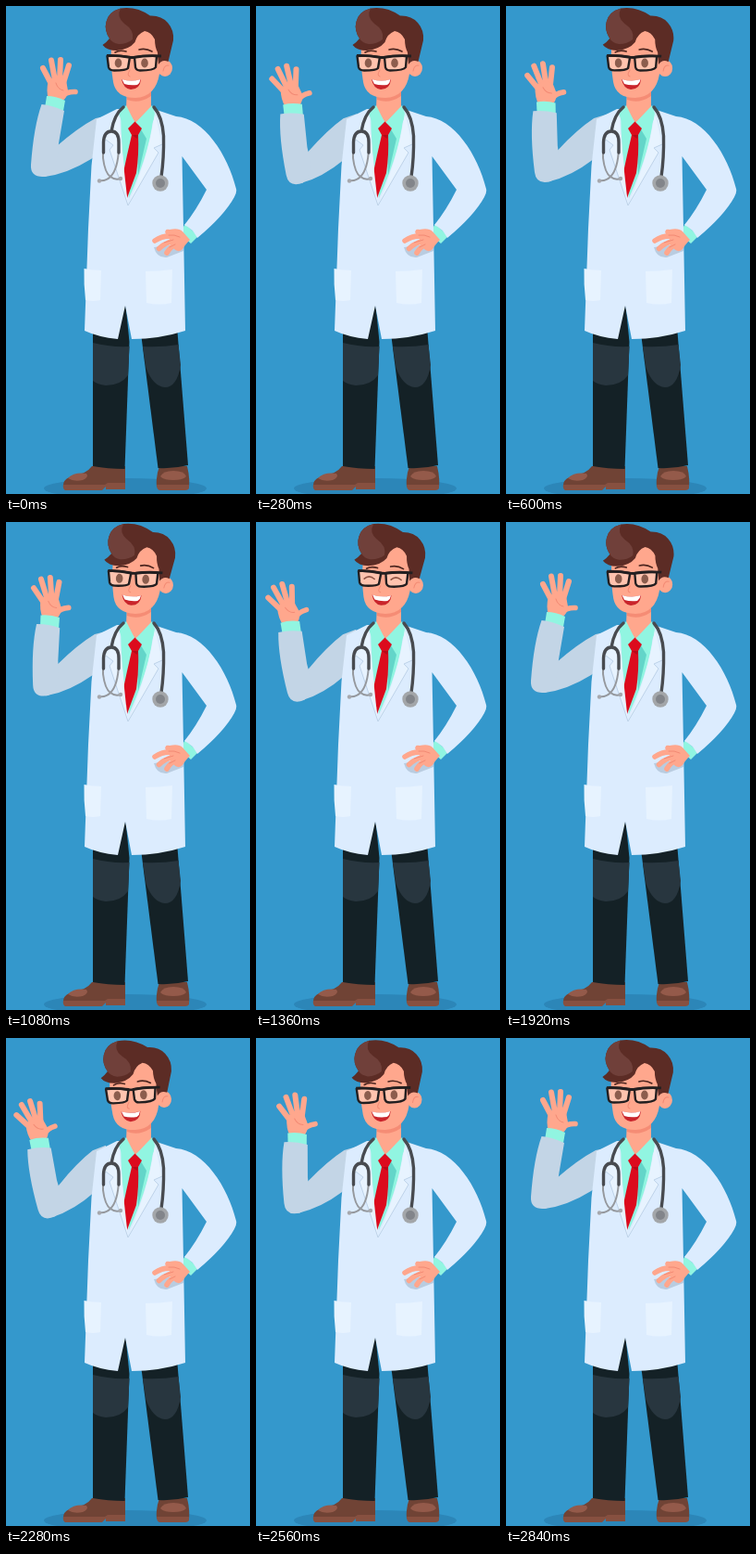
These frames come from a looping animation (264x526 px, 2.88 s). An HTML page:

```html
<!DOCTYPE html>
<html lang="en">
<head>
<meta charset="utf-8">
<title>Waving doctor</title>
<style>
  html, body { margin: 0; width: 100%; height: 100%; overflow: hidden; background: #3498cc; }
  svg { display: block; width: 100%; height: 100%; }
  .skin { fill: #ffa78d; }
  .finger { fill: none; stroke: #ffa78d; stroke-linecap: round; stroke-linejoin: round; }
  .crease { fill: none; stroke: #f28a74; stroke-width: 1; stroke-linecap: round; }
  .sleeve { fill: #c3d5e6; }
  .coat { fill: #dcecfe; }
  .pocket { fill: #e7f3ff; }
  .mint { fill: #91f5e1; }
  .trousers { fill: #142126; }
  .knee { fill: #28363f; }
  .shoe { fill: #704335; }
  .toe { fill: #945a4a; }
  .sole { fill: #875040; }
  .tube { fill: none; stroke: #484b50; stroke-width: 3.4; stroke-linecap: round; }
  .metal { fill: none; stroke: #95989d; stroke-width: 2; stroke-linecap: round; stroke-linejoin: round; }
  .frame { fill: #ffc3ae; stroke: #231f20; stroke-width: 2.4; stroke-linejoin: round; }
  .brow { fill: none; stroke: #4b251f; stroke-width: 1.6; stroke-linecap: round; }
  .lid { fill: none; stroke: #8f5545; stroke-width: 1.6; stroke-linecap: round; }
</style>
</head>
<body>
<svg viewBox="0 0 264 526" preserveAspectRatio="none">
  <ellipse cx="129" cy="520" rx="88" ry="11" fill="#2c86b8"/>

  <!-- shoes and legs -->
  <path class="shoe" d="M93 496H129V518H62Q61 509 74 506Q87 504 93 496Z"/>
  <path class="toe" d="M67 509Q74 502 87 504Q90 508 83 511Q73 513 67 509Z"/>
  <path class="sole" d="M62 516H107L110 514H129V521H108V518L104 522H64Q61 520 62 516Z"/>
  <path class="shoe" d="M166 496H196Q199 508 198 518H163Q162 507 166 496Z"/>
  <path class="toe" d="M167 507Q170 501 181 501Q193 501 195 507Q192 511 181 511Q170 511 167 507Z"/>
  <path class="sole" d="M163 516H198V520Q197 522 194 522H167Q163 522 163 516Z"/>
  <path class="trousers" d="M94 345L122 318H129L133.500 362L128.500 499Q110 499 94 496Z"/>
  <path class="trousers" d="M145 345H185L197 495Q181 499 164.500 498Z"/>
  <path class="knee" d="M94 363Q113 368 133.500 367L132 398Q124 409 108 409Q99 408 94 404Z"/>
  <path class="knee" d="M148 367Q168 368 186.500 365L189 387Q185 411 172 411Q159 410 151.500 390Z"/>

  <!-- waving arm -->
  <g id="arm">
    <path class="sleeve" d="M112 118L97 121Q78 131 55 151L38 162Q29 184 42 184Q66 181 92 165L112 150Z"/>
    <g id="forearm">
      <path class="finger" stroke-width="6" d="M49 84L40 67M53 80L49 58.500M58 80L59 58M62 83L68 64"/>
      <path class="finger" stroke-width="5.600" d="M61 97Q66 92 75 92.500"/>
      <path class="skin" d="M46 80Q54 74 65 80L67 91Q67 97 62 102L46 100Q43 92 46 80Z"/>
      <path class="crease" d="M54 83Q56 90 62 91"/>
      <path class="mint" d="M44 97Q54 97 64 102L62 113L42 110Z"/>
      <path class="sleeve" d="M38.500 106Q50 107 63 113L57 148Q56 180 42 184Q26 185 27 171Q30 130 38.500 106Z"/>
    </g>
  </g>

  <!-- coat with the arm on the hip -->
  <path class="mint" d="M194 235L208 248L200 256L187 245Z"/>
  <path class="coat" d="M98 122L120 111H160L184 119C214 121 240 160 249 197Q250 201 247 206Q236 226 207 250Q202 240 193 236Q206 220 217 198L190.500 162L192 240L194 350Q166 359 136 359L129 323L121 359Q100 357 85 350L89 240L92.500 172Z"/>
  <path class="pocket" d="M84.500 283Q94 285 103 285L102 317Q94 319 86 317Q84 300 84.500 283ZM151 286Q166 286 180 284L179 320Q166 323 152 320Z"/>

  <!-- shirt, neck and tie -->
  <path class="mint" d="M124 110L160 109Q159 150 133 207Q124 158 124 110Z"/>
  <path fill="#63d5c9" d="M146 133L152 143L143 182L142 139Z"/>
  <path class="skin" d="M131 86H157V111L140 126L130 111Z"/>
  <path fill="#f58c75" d="M131 95Q144 100 157 91V97Q144 106 131 101Z"/>
  <path class="mint" d="M130 107L139 125L130 137L122 116ZM158 107L141 125L152 140L162 118Z"/>
  <path fill="#dc0b1d" d="M139.500 124.500L147 132L143 139Q144 160 141 180L131 207L126 184Q131 160 136 139L132 132Z"/>
  <path fill="#b60818" d="M136 139H143L142 143Z"/>
  <path class="pocket" d="M122 115L108 144L116 150L112 155L132 215Q126 165 122 115ZM161 115L169 149L160 153L165 158L132 215Q155 160 161 115Z"/>
  <path fill="none" stroke="#bed3e9" d="M108 144L116 150L112 155L132 215L165 158L160 153L169 149"/>

  <!-- stethoscope -->
  <path class="metal" d="M105 154V164Q107 180 113 184M122 154Q121 176 113 184M101 188Q108 189 113 184Q118 188 124 186"/>
  <path class="tube" d="M105.500 158V147Q106 135 114 135Q122 135 122 147V158M114 135Q117 117 127 109M160 109Q169 119 170.500 140Q171 164 168 184"/>
  <circle cx="101" cy="188.500" r="2.200" fill="#a6a8ad"/>
  <circle cx="124" cy="186" r="2.200" fill="#a6a8ad"/>
  <circle cx="167" cy="191" r="8.700" fill="#a3a6a9"/>
  <circle cx="167" cy="191" r="5" fill="#82858a"/>

  <!-- hand on the hip -->
  <path fill="#b9cce0" d="M160 260Q163 272 174 271L192 264V256Z"/>
  <path class="finger" stroke-width="5.600" d="M187 246L175 243.500M182 249Q172 246 161 253M182 253Q172 255 165.500 261.500M186 256Q178 259 174 266"/>
  <path class="skin" d="M177 241Q187 239 191 243L199 252Q194 257 191 262Q186 267 181 261L176 249Z"/>
  <path class="crease" d="M181 252L171 255M183 257L177 260M188 249Q182 246 176 247"/>

  <g id="head">
    <ellipse class="skin" cx="172" cy="67" rx="8" ry="9"/>
    <path class="crease" d="M170 70Q171 63 176 64"/>
    <path class="skin" d="M114 40L140 22H167L166 73Q162 98 140 99Q119 99 116 82Q113 65 114 40Z"/>
    <path fill="#5c2c25" d="M104.500 42Q108 40 112 35Q106 26 108.500 17Q111 6 124 2.500Q141 0 156 10.500Q168 10 175 18Q182 26 181 37L175.500 60Q169 57 165 63Q164 56 164 50Q161 44 161 36Q157 28 150 27Q142 30 139.500 39Q133 47 120 48Q109 48 104.500 42Z"/>
    <path fill="#70403a" d="M112 35Q106 26 108.500 17Q111 6 124 2.500Q119 12 128 19Q139 26 137 36Q131 41 122 41Q115 40 112 35Z"/>
    <path class="frame" d="M109.500 54Q121 53 134 55L132 67Q130 69.500 117 69.500Q112 69.500 111 66ZM139 55Q151 53 163 54L162 66Q160 69.500 145 69.500Q141 69.500 140 66Z"/>
    <path fill="none" stroke="#231f20" stroke-width="2.800" d="M109 53.500Q121 53 134 55.500H139Q151 53 168 54"/>
    <g id="openEyes">
      <g fill="#8c5d4d">
        <ellipse cx="121.500" cy="61.500" rx="3.800" ry="5"/>
        <ellipse cx="150" cy="61.500" rx="3.800" ry="5"/>
      </g>
      <path class="brow" d="M118 50Q123 47 130 49M144 47Q151 45 158 49"/>
    </g>
    <g id="closedEyes">
      <path class="lid" d="M116 62Q121 57 127 62M145 62Q150 57 156 62"/>
      <path class="brow" d="M118 51Q123 48 130 50M144 48Q151 46 158 50"/>
    </g>
    <path class="crease" stroke-width="1.500" d="M134 69Q130 75 134 76"/>
    <path fill="#c9242b" d="M125 79Q136 82 146 79Q145 90 135 90Q127 89 125 79Z"/>
    <path fill="#fff" d="M125.500 79Q136 82 145.500 79Q145 83 142 85Q134 86 128 84Z"/>
  </g>
</svg>
<script>
  const LOOP = 2880, WAVE = 960, STEP = 40;
  const el = id => document.getElementById(id);
  const rotate = (id, angle, x, y) =>
    el(id).setAttribute('transform', `rotate(${angle} ${x} ${y})`);

  // Linear interpolation through [time, value] pairs.
  function track(keys, t) {
    const i = keys.findIndex(([time]) => time >= t);
    if (i <= 0) return keys[i < 0 ? keys.length - 1 : 0][1];
    const [t0, v0] = keys[i - 1], [t1, v1] = keys[i];
    return v0 + (v1 - v0) * (t - t0) / (t1 - t0);
  }

  const waveKeys = [[0, 0], [360, -10], [920, 0], [960, 0]];
  const headKeys = [[0, 0], [560, 0], [920, 2], [1680, 2], [2280, -2], [2880, 0]];
  const blinks = [[300, 460], [1260, 1420]];

  function draw(now) {
    const t = Math.floor((now % LOOP) / STEP) * STEP;
    const swing = track(waveKeys, t % WAVE);
    rotate('arm', swing, 97, 140);
    rotate('forearm', swing, 43, 168);
    rotate('head', track(headKeys, t), 142, 95);
    const closed = blinks.some(([from, to]) => t >= from && t < to);
    el('openEyes').style.display = closed ? 'none' : '';
    el('closedEyes').style.display = closed ? '' : 'none';
  }

  const start = performance.now();
  (function tick() {
    draw(performance.now() - start);
    requestAnimationFrame(tick);
  })();
</script>
</body>
</html>
```
